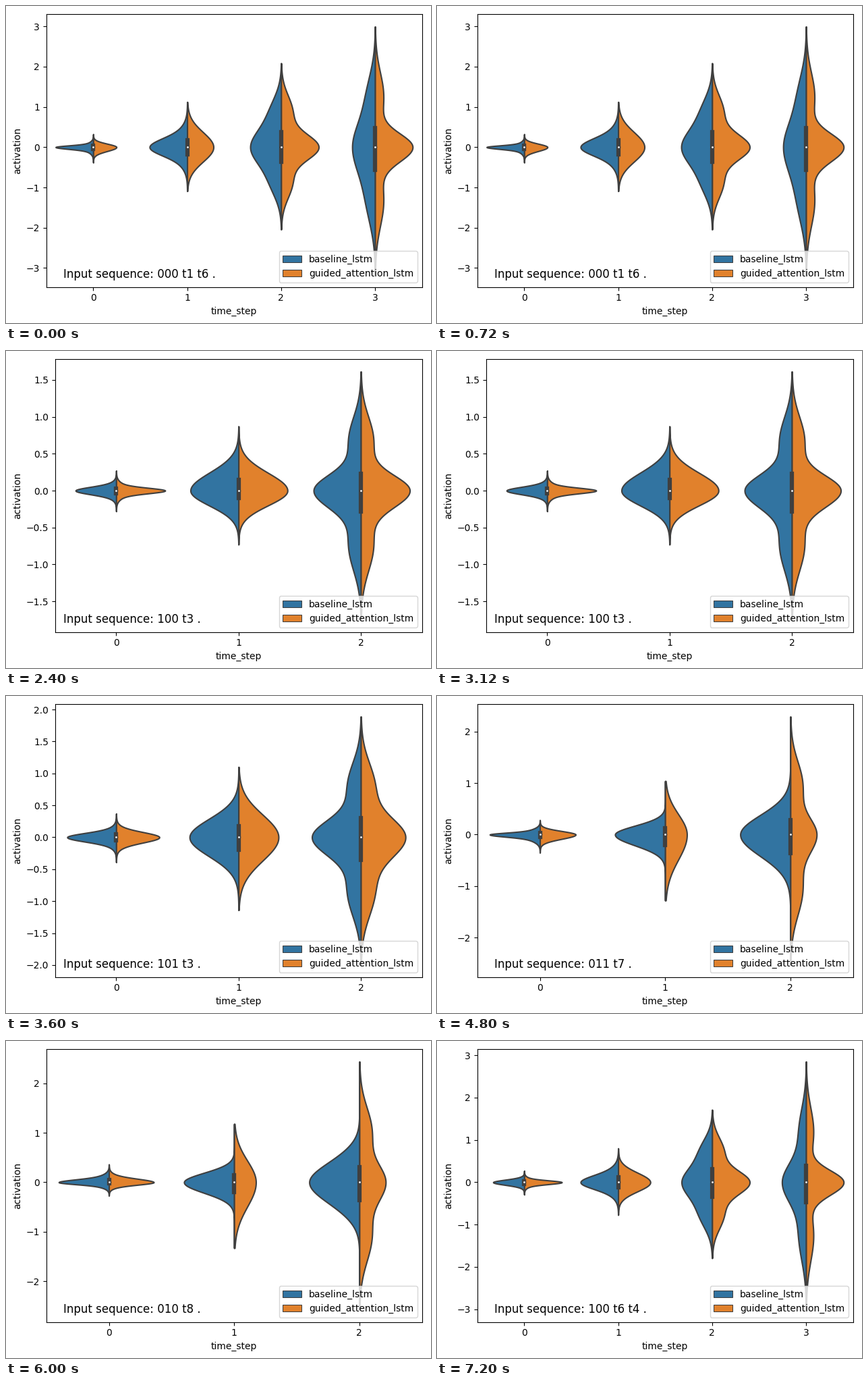
Write a matplotlib script that moves like this. It is 630x470 px and loops after 8000 ms.

```python
import numpy as np
import matplotlib.pyplot as plt
from matplotlib.animation import FuncAnimation
from matplotlib.patches import Patch

W, H, DPI = 630, 470, 100
TOP, BOTTOM, RIGHT = 12.3, 416.7, 616.7
BLUE, ORANGE, GRAY = "#3274a1", "#e1812c", "#3f3f3f"
LINE = 1.5
U = np.linspace(-1, 1, 401)

# Per time step: lowest value, highest value, core spread of blue and orange.
# "core" is the least share of the core, "reach" how far blue's tails extend.
SCENES = [
    dict(sequence="000 t1 t6", steps=[
        (-0.38, 0.32, 0.12, 0.26), (-1.09, 1.12, 0.18, 0.33),
        (-2.04, 2.08, 0.21, 0.155), (-3.165, 2.99, 0.205, 0.115)]),
    dict(sequence="011 t4 t7", steps=[
        (-0.35, 0.28, 0.105, 0.22), (-1.24, 1.04, 0.3, 0.265),
        (-2.05, 2.0, 0.168, 0.168), (-3.241, 3.217, 0.14, 0.11)]),
    dict(sequence="100 t3", steps=[
        (-0.28, 0.27, 0.17, 0.13), (-0.73, 0.87, 0.28, 0.275),
        (-1.749, 1.612, 0.137, 0.132)]),
    dict(sequence="101 t3", steps=[
        (-0.39, 0.37, 0.165, 0.2), (-1.14, 1.1, 0.25, 0.32),
        (-1.994, 1.888, 0.145, 0.16)]),
    dict(sequence="011 t7", core=0.42, reach=0.55, steps=[
        (-0.35, 0.28, 0.117, 0.23), (-1.28, 1.04, 0.3, 0.38),
        (-2.528, 2.292, 0.3, 0.147)]),
    dict(sequence="010 t8", core=0.42, reach=0.55, steps=[
        (-0.27, 0.36, 0.14, 0.17), (-1.33, 1.18, 0.29, 0.37),
        (-2.577, 2.44, 0.28, 0.15)]),
    dict(sequence="100 t6 t4", steps=[
        (-0.29, 0.27, 0.2, 0.15), (-0.77, 0.8, 0.19, 0.28),
        (-1.79, 1.71, 0.2, 0.16), (-3.009, 2.849, 0.16, 0.1)]),
]

plt.rcParams["font.family"] = "DejaVu Sans"
fig = plt.figure(figsize=(W / DPI, H / DPI), dpi=DPI, facecolor="white")
ax = fig.add_axes([0.1, 0.1, 0.8, 0.8])
caption = fig.text(0.135, 0.1421, "", fontsize=12)
legend_keys = [
    Patch(facecolor=color, edgecolor=GRAY, linewidth=LINE / 2, label=label)
    for color, label in ((BLUE, "baseline_lstm"),
                         (ORANGE, "guided_attention_lstm"))
]


def bell(u, mean, sd):
    return np.exp(-0.5 * ((u - mean) / sd) ** 2) / sd


def density(u, step, spread, core):
    """A core bell with two shoulders that move outwards over the steps."""
    share = np.clip(core + 6 * (spread - 0.2), core, 1)
    stage = min(step, 2)
    offset, sd = 0.21 * stage, 0.28 - 0.04 * stage
    shoulders = bell(u, offset, sd) + bell(u, -offset, sd)
    return share * bell(u, 0, spread) + (1 - share) / 2 * shoulders


def violin(step, low, high, blue, orange, core, reach):
    y = np.where(U < 0, -low * U, high * U)
    reach = reach if step else 1
    left = density(U / reach, step, blue, core) / reach
    right = density(U, step, orange, core)
    scale = 0.4 / max(left.max(), right.max())
    ax.fill_betweenx(y, step - scale * left, step, facecolor=BLUE,
                     edgecolor=GRAY, linewidth=LINE)
    ax.fill_betweenx(y, step, step + scale * right, facecolor=ORANGE,
                     edgecolor=GRAY, linewidth=LINE)

    # the raw data lie a little closer together than the smoothed curve
    total = np.cumsum((left + right) * np.gradient(y))
    quartiles = 0.85 * np.interp([0.25, 0.75], total / total[-1], y)
    ax.plot([step, step], quartiles, color=GRAY, linewidth=3 * LINE,
            solid_capstyle="projecting")
    ax.scatter(step, 0, s=(2 * LINE) ** 2, color="white", edgecolor=GRAY,
               linewidth=1, zorder=3)


def draw_scene(sequence, steps, core=0.55, reach=1):
    low, high = steps[-1][:2]
    pad = 0.05 * (high - low)
    # decimal tick labels need more room
    left = 72.7 if high < 2 else 59.7

    ax.clear()
    ax.set_position([left / W, 1 - BOTTOM / H,
                     (RIGHT - left) / W, (BOTTOM - TOP) / H])
    for step, shape in enumerate(steps):
        violin(step, *shape, core, reach)
    ax.set_xlim(-0.5, len(steps) - 0.5)
    ax.set_ylim(low - pad, high + pad)
    ax.set_xticks(range(len(steps)))
    ax.set_xlabel("time_step")
    ax.set_ylabel("activation")
    ax.legend(handles=legend_keys, loc="lower right")
    caption.set_text(f"Input sequence: {sequence} .")


def draw(tick):
    # each scene holds for three 400 ms ticks, the last one for two
    draw_scene(**SCENES[tick // 3])
    return []


anim = FuncAnimation(fig, draw, frames=20, interval=400, repeat=True,
                     repeat_delay=0)
plt.show()
```
